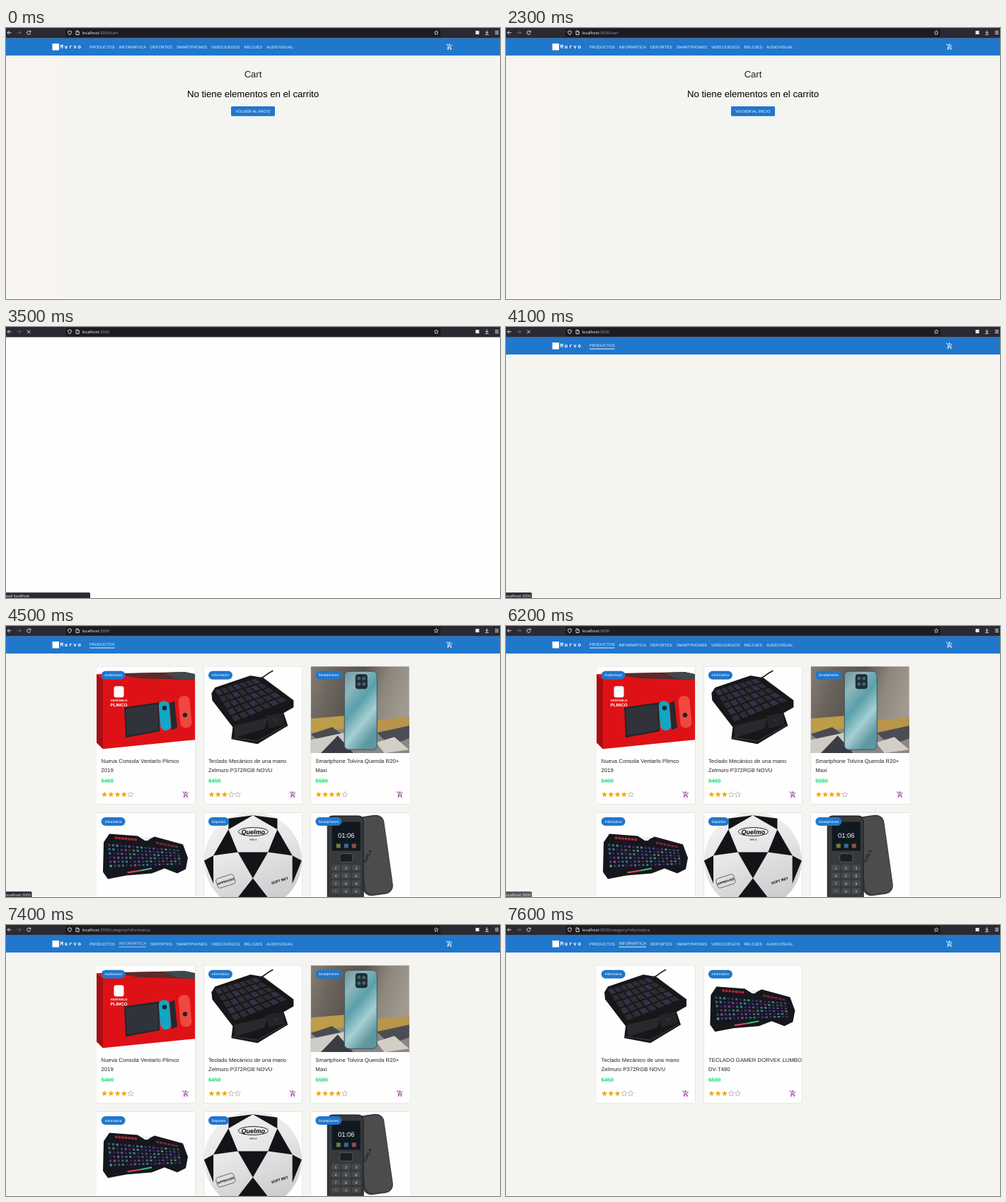
Recreate the animation shown at these times as an HTML page. Size 698 by 384 pixels, loop 8000 ms.

```html
<!DOCTYPE html>
<html lang="es">
<head>
<meta charset="utf-8">
<style>
html, body { margin: 0; width: 698px; height: 384px; overflow: hidden; }
svg { display: block; font-family: "Liberation Sans", Arial, sans-serif; text-rendering: geometricPrecision; }
.ui { font-family: "Open Sans", "Noto Sans", sans-serif; font-size: 5.7px; }
.brand { font: bold 7.4px "DejaVu Sans Mono", monospace; letter-spacing: 1.8px; }
.nav { font-size: 5.6px; fill: #e8f1fa; }
.title { font-size: 7.7px; letter-spacing: .06px; fill: #222; }
.price { font-size: 7.9px; font-weight: bold; fill: #33e58a; text-decoration: line-through; }
.mid { text-anchor: middle; }
.line { fill: none; stroke: #e8e8ec; stroke-width: .9; }
.raised { filter: drop-shadow(0 .7px .5px #0005); }
</style>
</head>
<body>
<svg id="stage" width="698" height="384"></svg>
<script>
const BLUE = '#2077cc', PAGE = '#f4f4f1';

const rect = (x, y, w, h, fill, extra = '') =>
  `<rect x="${x}" y="${y}" width="${w}" height="${h}" fill="${fill}" ${extra}/>`;
const poly = (points, fill) => `<polygon points="${points}" fill="${fill}"/>`;
const text = (x, y, str, cls = '', extra = '') =>
  `<text x="${x}" y="${y}" class="${cls}" ${extra}>${str}</text>`;
const group = (id, body) => `<g id="${id}">${body}</g>`;
const at = (x, y, body, more = '') => `<g transform="translate(${x} ${y}) ${more}">${body}</g>`;
const repeat = (n, fn) => Array.from({ length: n }, (_, i) => fn(i)).join('');

// Grid of keys laid over a quadrilateral a-b-c-d
function keys([a, b, c, d], cols, rows, paint, size = .78) {
  const mix = (p, q, k) => p + (q - p) * k;
  const point = (u, v) => [0, 1].map(i => mix(mix(a[i], b[i], u), mix(d[i], c[i], u), v).toFixed(1));
  return repeat(rows, r => repeat(cols, k => {
    const u = k / cols, v = r / rows, u2 = (k + size) / cols, v2 = (r + size) / rows;
    return poly([point(u, v), point(u2, v), point(u2, v2), point(u, v2)].join(' '), paint(k, r));
  }));
}

// Black triangles of an icosidodecahedron, seen with one white pentagon tilted up
function ballPanels(cx, cy, radius) {
  const rad = Math.PI / 180, tilt = 37 * rad;
  const spot = (polar, turn) => {
    const x = Math.sin(polar * rad) * Math.sin(turn * rad);
    const y = -Math.sin(polar * rad) * Math.cos(turn * rad), z = Math.cos(polar * rad);
    return {
      x: cx + radius * x,
      y: cy - radius * (y * Math.cos(tilt) + z * Math.sin(tilt)),
      depth: z * Math.cos(tilt) - y * Math.sin(tilt)
    };
  };
  const panel = corners => corners.reduce((sum, p) => sum + p.depth, 0) > 0
    ? poly(corners.map(p => `${p.x.toFixed(1)},${p.y.toFixed(1)}`).join(' '), '#131417') : '';
  return repeat(5, k => {
    const turn = 72 * k, tip = spot(58.3, turn);
    return panel([spot(31.7, turn - 36), spot(31.7, turn + 36), tip]) +
      panel([tip, spot(90, turn - 18), spot(90, turn + 18)]);
  });
}

const starPoints = Array.from({ length: 10 }, (_, i) => {
  const r = i % 2 ? 1.9 : 4.2, angle = i * Math.PI / 5;
  return `${(r * Math.sin(angle)).toFixed(2)},${(-r * Math.cos(angle)).toFixed(2)}`;
}).join(' ');
const star = (x, y, on) => at(x, y,
  `<polygon points="${starPoints}" fill="${on ? '#f2a80f' : 'none'}" stroke="${on ? 'none' : '#aaa'}" stroke-width=".7"/>`);

const cartIcon = (x, y, color) => at(x, y,
  `<g fill="none" stroke="${color}" stroke-width="2"><path d="M1 3h3l4.5 9h8l4-7.5M8 12l-2 4h13M12 1v8M8 5h8"/></g>
   <g fill="${color}"><circle cx="7" cy="20" r="2"/><circle cx="17" cy="20" r="2"/></g>`, 'scale(.42)');

// Product pictures, 139 by 123
const pictures = {
  console: poly('0,11 125,8 139,11 139,104 9,117 0,108', '#de1216') +
    poly('0,11 9,20 9,117 0,108', '#a80d12') +
    poly('22,10 125,8 139,11 139,19 60,17', '#5b2a2a') +
    poly('96,9 125,8 139,11 139,19 112,17', '#3c4a4e') +
    rect(24.5, 28, 14, 16, '#fff', 'rx="3"') +
    text(31.5, 50, 'VENTARLO', 'mid', 'font-size="4.4" font-weight="bold" fill="#fff"') +
    text(31.5, 56.4, 'PLIMCO', 'mid', 'font-size="6.2" font-weight="bold" fill="#fff"') +
    poly('39,58 88,51 89,92 41,101', '#23262b') +
    poly('41,60 86,54 87,90 43,98', '#30343a') +
    rect(89, 49, 15, 42, '#12a5c4', 'rx="7" transform="rotate(-5 96 70)"') +
    poly('103,52 110,49 114,87 106,90', '#26282d') +
    rect(117, 42, 16, 45, '#f0483f', 'rx="7" transform="rotate(-5 125 65)"') +
    repeat(2, i => `<circle cx="${96 + i * 29}" cy="${59 + i * 10}" r="3.2" fill="#222"/>`),
  keypad: poly('11,38 16,30 66,13 84,16 127,48 127,58 113,66 119,84 76,110 39,103 41,86 12,48', '#17171a') +
    keys([[16, 34], [75, 17], [122, 49], [45, 80]], 7, 5, (k, r) => (k + r) % 3 ? '#2d2d34' : '#352f48') +
    poly('43,84 90,73 86,88 44,101', '#29292d') +
    poly('88,70 112,66 114,82 92,88', '#242428') +
    '<path d="M74 18C88 16 84 13 98 6" fill="none" stroke="#222" stroke-width="1.8"/>' +
    '<path d="M40 101L76 106 117 83M98 74l5 4" fill="none" stroke="#55474c" stroke-width=".8"/>',
  phone: rect(0, 0, 139, 123, 'url(#room)') +
    poly('0,80 48,72 139,78 139,123 0,123', '#8a8685') +
    poly('0,74 48,70 48,88 0,94', '#bd9c4a') +
    poly('93,76 139,72 139,88 93,94', '#b8954a') +
    poly('0,96 30,86 47,98 20,112', '#4a4a50') +
    poly('0,104 47,94 47,123 0,123', '#cfcbc5') +
    poly('14,123 38,98 60,123', '#3b3c43') +
    poly('93,94 139,84 139,102 112,112', '#4c4d54') +
    poly('92,108 118,100 139,118 104,123', '#d3cec6') +
    rect(47.5, 7, 46, 111, 'url(#teal)', 'rx="6" stroke="#35545c"') +
    rect(63, 11, 17, 21, '#1d2d33', 'rx="4"') +
    repeat(4, i => `<circle cx="${68 + i % 2 * 7}" cy="${17 + (i >> 1) * 8}" r="2.5" fill="#45616b"/>`),
  keyboard: poly('10,42 18,30 58,33 69,40 82,34 122,45 129,64 126,80 114,86 96,79 78,86 42,89 16,94 9,84', '#16171c') +
    poly('63,35 78,35 72,40', '#eee') +
    keys([[26, 34], [58, 37], [58, 41], [26, 38]], 7, 1, () => '#b3263d') +
    keys([[84, 41], [116, 48], [116, 51], [84, 45]], 6, 1, () => '#7d2440') +
    keys([[16, 44], [119, 53], [122, 75], [19, 80]], 18, 6,
      (k, r) => `hsl(${175 + (k * 17 + r * 23) % 115} 40% ${24 + (k + r) % 3 * 11}%)`, .55) +
    poly('43,84 62,81 62,83 44,86', '#e34655') + poly('62,81 78,78 78,80 62,83', '#38c58a'),
  ball: '<circle cx="69.5" cy="68" r="69" fill="url(#leather)"/>' + ballPanels(69.5, 68, 69) +
    '<ellipse cx="70" cy="27" rx="21" ry="6" fill="none" stroke="#222"/>' +
    text(70, 30, 'Quelmo', 'mid', 'font-size="9" font-weight="bold" font-style="italic"') +
    text(70, 39, 'MS-4', 'mid', 'font-size="4"') +
    at(31, 97, rect(-13, -7, 26, 14, 'none', 'rx="4" stroke="#555" stroke-width=".8"') +
      text(0, 2, 'APPROVED', 'mid', 'font-size="4.4" font-weight="bold"'), 'rotate(-18)') +
    text(108, 98, 'SOFT BET', 'mid', 'font-size="5" font-weight="bold" transform="rotate(-18 108 98)"'),
  mobile: rect(67, 4, 43, 113, '#3a3b3d', 'rx="12" transform="rotate(-8 89 60)"') +
    rect(71, 6, 38, 109, '#4b4c4e', 'rx="11" transform="rotate(-8 89 60)"') +
    text(82, 63, 'VURLA', 'mid', 'font-size="6" font-weight="bold" fill="#1f2021" transform="rotate(-64 82 63)"') +
    rect(23, 4, 52, 122, '#252628', 'rx="8"') + rect(24.5, 5.5, 49, 120, '#37393b', 'rx="7"') +
    rect(30, 13, 40, 41, '#101820') +
    text(50, 35, '01:06', 'mid', 'font-size="9.4" fill="#fff"') +
    repeat(3, i => rect(36 + i * 11, 44, 6, 6, ['#6b7e39', '#386a91', '#8c5146'][i])) +
    rect(41, 58, 18, 12, '#1d1e20', 'rx="3" stroke="#66696c" stroke-width=".7"') +
    repeat(12, i => rect(29 + i % 3 * 14.5, 74 + (i / 3 | 0) * 11, 12.5, 8, '#484b4e', 'rx="2"') +
      text(35.2 + i % 3 * 14.5, 80 + (i / 3 | 0) * 11, '123456789*0#'[i], 'mid', 'font-size="5" fill="#ddd"'))
};

const products = {
  console: ['Audiovisual', 34, 'Nueva Consola Ventarlo Plimco', '2019', '$400', 4],
  keypad: ['Informatica', 34, 'Teclado Mecánico de una mano', 'Zelmuro P372RGB NOVU', '$450', 3],
  phone: ['Smartphones', 37, 'Smartphone Tolvira Quenda R20+', 'Maxi', '$580', 4],
  keyboard: ['Informatica', 34, 'TECLADO GAMER DORVEK LUMBO', 'DV-T480', '$500', 3],
  ball: ['Deportes', 29, 'Balón de Fútbol Quelmo', 'Soft', '$120', 4],
  mobile: ['Smartphones', 37, 'Teléfono Vurla', 'Clásico', '$150', 3]
};

function card(name, i) {
  const [tag, width, line1, line2, price, rating] = products[name];
  return at(128 + i % 3 * 151.35, 57.2 + (i / 3 | 0) * 207.3,
    rect(0, 0, 139.3, 195, '#fefefe', 'rx="1.5" class="raised"') +
    `<g clip-path="url(#photo)">${pictures[name]}</g>` +
    rect(6.6, 6.5, width, 12, BLUE, 'rx="6"') +
    text(6.6 + width / 2, 14.3, tag, 'mid', 'font-size="4.8" fill="#fff"') +
    text(6.6, 137.3, line1, 'title') + text(6.6, 149.7, line2, 'title') +
    text(6.6, 164.6, price, 'price') +
    repeat(5, k => star(11.1 + k * 9.25, 181.6, k < rating)) +
    cartIcon(120.8, 176.6, '#8d238f'));
}
const grid = names => names.map(card).join('');

const links = [['PRODUCTOS', 118, 35.5], ['INFORMÁTICA', 159.5, 38.5], ['DEPORTES', 204, 0], ['SMARTPHONES', 241, 0],
  ['VIDEOJUEGOS', 290, 0], ['RELOJES', 336.5, 0], ['AUDIOVISUAL', 368, 0]];
const link = ([label, x], i) => text(x, 29, label, 'nav', `id="link${i}"`);
const underline = i => rect(links[i][1], 30.6, links[i][2], .9, '#fff', `id="under${i}"`);

const toolbar = rect(0, 0, 698, 14.4, '#2b2a33') + rect(84, 1, 530, 12, '#1c1b22', 'rx="2"') +
  `<g class="line">
    <path d="M7.5 6.7H2M4.5 4.2L2 6.7l2.5 2.5"/>
    <path d="M15.5 6.7H21M18.5 4.2L21 6.7l-2.5 2.5" opacity=".35"/>
    <path id="reload" d="M34.3 5.2A2.6 2.6 0 1 0 34.6 7.5M34.8 3.6v2.2h-2.2"/>
    <path id="stop" d="M29.8 4.5l4.5 4.5M34.3 4.5l-4.5 4.5"/>
    <path d="M90 3.8l2.4 1c0 2.5-.6 3.9-2.4 5-1.8-1.1-2.4-2.5-2.4-5z"/>
    <path d="M99 4h2.6l1.6 1.6v3.9H99zM101.4 4v1.8h1.8"/>
    <path d="M677 9.4h5M679.5 3.5v4.2M677.4 5.8l2.1 2.1 2.1-2.1M691 4.5h5M691 6.5h5M691 8.5h5"/>
    <polygon points="${starPoints}" transform="translate(608 6.8) scale(.75)"/>
  </g>` + rect(663.5, 4, 5, 5, '#e8e8ec') +
  '<text x="107.6" y="8.7" class="ui" fill="#fbfbfe">localhost<tspan id="path" fill="#9b9aa3"></tspan></text>';

const header = rect(0, 14.4, 698, 24.6, BLUE, 'class="raised"') + rect(65.5, 22, 9.5, 9.5, '#fff') +
  text(76.6, 29.4, 'Murvo', 'brand', 'fill="#fff"') + cartIcon(621.5, 21.8, '#fff') +
  link(links[0], 0) + group('menu', links.slice(1).map((l, i) => link(l, i + 1)).join('')) +
  underline(0) + underline(1);

const emptyCart = rect(0, 39, 80, 344, '#f8f4ef') +
  text(349, 69.7, 'Cart', 'mid', 'font-size="13" fill="#222"') +
  text(349, 98, 'No tiene elementos en el carrito', 'mid', 'font-size="13.2"') +
  rect(318, 111, 62, 13.7, BLUE, 'rx="1.6" class="raised"') +
  text(349, 119.8, 'VOLVER AL INICIO', 'mid', 'font-size="5.5" letter-spacing=".08" fill="#fff"');

const gradient = (id, dir, colors) => `<linearGradient id="${id}" ${dir}>` +
  colors.map((c, i) => `<stop offset="${i / (colors.length - 1)}" stop-color="${c}"/>`).join('') + '</linearGradient>';

const stage = document.getElementById('stage');
stage.innerHTML = '<defs><clipPath id="photo"><rect width="139.3" height="122.8"/></clipPath>' +
  gradient('room', 'x2="1" y2=".3"', ['#857d75', '#6b645d', '#5a544e', '#8d867d', '#a19a90']) +
  gradient('teal', 'x2=".5" y2="1"', ['#6f969d', '#8fb6bb', '#5b9fab', '#a5d0d2', '#5f97a1']) +
  gradient('leather', 'x2=".4" y2="1"', ['#f3f3f1', '#e6e7e7', '#cccecf']) + '</defs>' +
  rect(0, 0, 698, 384, '#fefefe') +
  group('site', rect(0, 14, 698, 369, PAGE) + group('cart', emptyCart) +
    group('all', grid(Object.keys(products))) + group('filtered', grid(['keypad', 'keyboard'])) + header) +
  toolbar +
  group('status', '<rect id="statusBox" x="-3" y="376.3" height="11" rx="1.5" fill="#2b2a33"/>' +
    text(0, 382.6, '', 'ui', 'id="statusText" fill="#fbfbfe" style="font-size:5.4px"'));

const el = {};
stage.querySelectorAll('[id]').forEach(node => el[node.id] = node);
const show = (id, opacity) => el[id].setAttribute('opacity', +opacity);
const clamp = v => Math.max(0, Math.min(1, v));

function statusAt(t) {
  const fade = (from, to) => Math.min(clamp((t - from + 100) / 200), clamp((to - t) / 250));
  if (t >= 3300 && t < 4100) return ['Read localhost', -3.4, 122, 1];
  if (t < 6500) return ['localhost:3000', -1.4, 39.5, fade(3000, 6400)];
  return ['localhost:3000/category/informatica', -1.4, 95, fade(6600, 7400)];
}

function draw(now) {
  const t = Math.floor(now % 8000 / 100) * 100;
  const loading = t >= 3200 && t < 4500, chosen = t >= 6900;
  show('site', t < 3300 || t >= 4100);
  show('cart', t < 3300);
  show('all', t >= 4500 && t < 7500);
  show('filtered', t >= 7500);
  show('menu', t < 3300 || t >= 4600);
  show('reload', !loading);
  show('stop', loading);
  show('under0', t >= 4100 && !chosen);
  show('under1', chosen ? (t < 7500 ? .7 : 1) : 0);
  show('link1', chosen && t < 7500 ? .8 : 1);
  el.link0.setAttribute('y', t >= 4100 && !chosen ? 28.4 : 29);
  el.link1.setAttribute('y', chosen ? 28.4 : 29);
  el.path.textContent = ':3000' + (t < 3200 ? '/cart' : chosen ? '/category/informatica' : '');

  const [label, x, width, opacity] = statusAt(t);
  el.statusText.textContent = label;
  el.statusText.setAttribute('x', x);
  el.statusBox.setAttribute('width', width);
  show('status', opacity);
  requestAnimationFrame(() => draw(performance.now() - start));
}
const start = performance.now();
draw(0);
</script>
</body>
</html>
```
